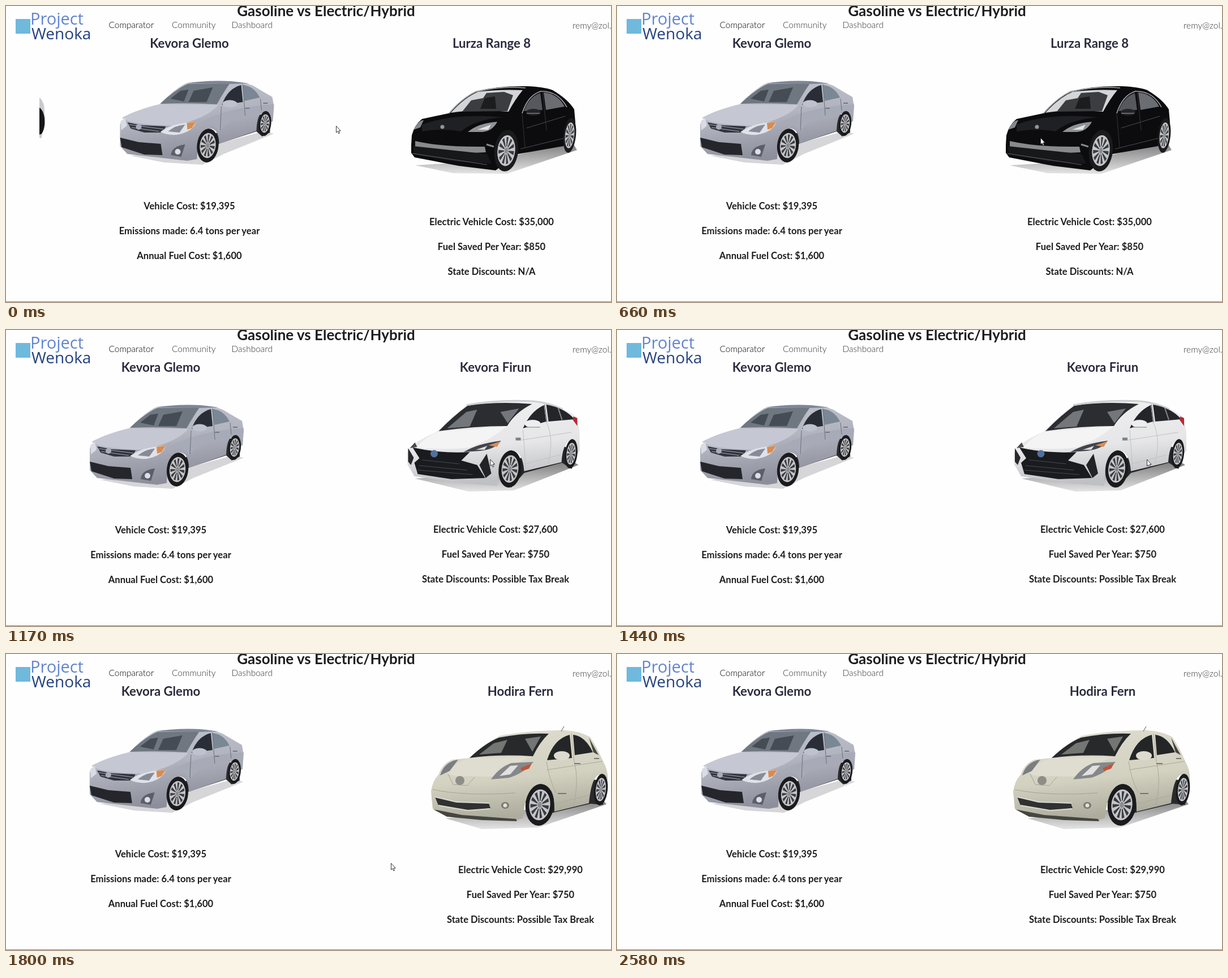
Animation, 1069 px wide and 524 px high, one loop 2890 ms. Source, as an HTML page:

```html
<!DOCTYPE html>
<html lang="en">
<head>
<meta charset="utf-8">
<title>Car comparator</title>
<style>
html, body { margin: 0; width: 100%; height: 100%; overflow: hidden; background: #fefefe; }
body > svg { display: block; }
text { font: 700 16.6px Lato, sans-serif; fill: #1d1d1f; }
.mid { text-anchor: middle; }
.head { font-size: 26px; }
.name { font-size: 22.2px; fill: #2a2b3c; }
.nav { font-size: 15.5px; font-weight: 300; fill: #333; }
.brand { font: 400 29px "Open Sans", sans-serif; }
</style>
</head>
<body>
<svg width="1069" height="524" viewBox="0 0 1069 524">
<defs>
  <linearGradient id="silver" x2="0.3" y2="1"><stop stop-color="#c3c6d0"/><stop offset=".5" stop-color="#b3b6c0"/><stop offset="1" stop-color="#8c8f9b"/></linearGradient>
  <linearGradient id="white" x2="0.2" y2="1"><stop stop-color="#f1f1f2"/><stop offset=".6" stop-color="#e6e6e8"/><stop offset="1" stop-color="#bfc0c4"/></linearGradient>
  <linearGradient id="cream" x2="0.2" y2="1"><stop stop-color="#dedccf"/><stop offset=".6" stop-color="#d3d1c0"/><stop offset="1" stop-color="#aeac9d"/></linearGradient>
  <linearGradient id="fade" x2="0" y2="1"><stop stop-color="#777"/><stop offset="1" stop-color="#e4e4e4"/></linearGradient>
  <g id="wheel">
    <circle r="1" fill="#1b1b1d"/><circle r=".74" fill="#c4c6ca"/>
    <circle r=".42" fill="none" stroke="#3b3c40" stroke-width=".46" pathLength="10" stroke-dasharray=".5 .5"/>
    <circle r=".15" fill="#8a8c90"/>
  </g>
</defs>

<svg x="59" width="428" height="524" viewBox="59 0 428 524">
<g id="left">
  <g class="car">
    <path d="M-20 160Q8 152 13 178L14 200L0 205Z" fill="#c9cace"/>
    <ellipse cx="1" cy="205" rx="13" ry="26" fill="#17171a"/>
    <path d="M-10 232L10 226L8 234Z" fill="#ccc"/>
    <path d="M165 265L290 252L400 222L419 226L330 262L293 281L225 277Z" fill="#d6d6d8"/>
    <path d="M380 192H412V224L398 231L388 222L321 244L300 262L288 240Z" fill="#2b2c31"/>
    <path d="M147 210Q150 194 196 181L217 174Q240 150 261 138Q300 132 341 133Q365 134 382 141Q402 153 416 161L419 178L417 204L411 206Q409 187 400 188Q389 191 388 221L322 244Q322 215 302 217Q284 222 283 271L266 274L160 262L147 248Z" fill="url(#silver)"/>
    <path d="M150 198Q175 184 216 174L321 175Q300 200 240 212Q190 211 163 204Z" fill="#c5c8d2"/>
    <path d="M285 209Q330 180 419 174L417 190Q350 190 322 222Q314 204 285 209Z" fill="#a7aab7"/>
    <path d="M218 173Q243 149 266 138L341 137Q331 151 318 174Q270 171 218 173Z" fill="#6f7780"/>
    <path d="M268 170L277 150L311 144L300 170ZM236 164L254 150L268 148L260 169Z" fill="#454c54"/>
    <path d="M262 137Q300 131 341 133L375 137L342 138Z" fill="#7d869a"/>
    <path d="M327 175Q337 146 361 140L364 170Z" fill="#292e36"/>
    <path d="M363 140Q383 141 394 162L367 168Z" fill="#7a8794"/>
    <path d="M364 139L368 194M326 178L324 220M395 164L397 185" fill="none" stroke="#6d707c"/>
    <path d="M368 181h8M400 172h8" stroke="#747784" stroke-width="2"/>
    <ellipse cx="341" cy="173" rx="13" ry="6.5" fill="#bec2ce"/>
    <path d="M160 206L185 211L228 213L222 224L190 224L166 217Z" fill="#33343d"/>
    <path d="M163 210L224 218M167 215L216 222" stroke="#a5a8b4"/>
    <circle cx="180" cy="214" r="5" fill="#a9adba"/>
    <path d="M218 223Q238 207 281 205Q276 223 247 228Q230 229 218 223Z" fill="#dfe2e8"/>
    <path d="M232 222Q245 211 262 210L252 224Z" fill="#878b97"/>
    <path d="M265 207L281 205L274 216L266 219Z" fill="#d98b4f"/>
    <path d="M148 204L156 198L159 212L149 220Z" fill="#d9dce2"/>
    <path d="M147 233L180 241L219 244L222 264L190 263L150 250Z" fill="#25262c"/>
    <path d="M237 264Q238 248 262 245L255 267Z" fill="#5c5f6a"/><circle cx="249" cy="258" r="5" fill="#dcdfe5"/>
    <use href="#wheel" transform="translate(302 247) rotate(6) scale(19 30)"/>
    <use href="#wheel" transform="translate(403 208) rotate(6) scale(11 22)"/>
  </g>
</g>
</svg>

<svg x="644" width="428" height="524" viewBox="644 0 428 524">
<g id="right">
  <g class="car">
    <path d="M723 282L860 274L1000 240L1009 255L885 297L790 296Z" fill="url(#fade)"/>
    <path d="M716 246L717 229Q722 210 735 200L782 190Q805 163 830 151Q870 141 920 142Q950 143 966 149Q993 165 1004 183L1006 206L1003 240L985 248L905 262L865 291L800 283L722 268L716 260Z" fill="#0c0c0e"/>
    <path d="M786 189Q810 162 834 152Q870 147 913 149Q899 166 888 187Q830 182 786 189Z" fill="#d3d5d7"/>
    <path d="M806 187L822 167L843 163L849 154L880 152L896 158L886 186Z" fill="#3c3d40"/>
    <path d="M838 182L846 163L864 160L866 182Z" fill="#1d1d20"/>
    <path d="M783 190Q806 163 830 152Q875 141 918 145M912 190Q922 158 945 151Q975 150 991 179" fill="none" stroke="#aaacb0" stroke-width="1.5"/>
    <path d="M915 186Q924 161 944 154L948 184Z" fill="#55585c"/>
    <path d="M950 153Q975 155 987 178L954 184Z" fill="#6a6d71"/>
    <path d="M948 151L955 220M912 191L917 250" stroke="#333438"/>
    <path d="M920 216L988 195M909 253L986 234" stroke="#4d4f54"/>
    <path d="M735 210Q790 189 878 197Q829 201 804 222Q770 216 735 222Z" fill="#1f2023"/>
    <path d="M816 223Q835 207 868 205Q860 221 842 223Z" fill="#8f9296"/><path d="M833 219L857 210L852 219Z" fill="#e1e2e4"/>
    <path d="M720 219Q728 203 738 202L732 215Z" fill="#85888c"/>
    <circle cx="771" cy="214" r="3.5" fill="#92959a"/>
    <path d="M723 239Q770 250 846 249L848 259Q770 263 723 249Z" fill="#888a8d"/>
    <path d="M719 248L850 262L858 279L790 275L722 263Z" fill="#17181a"/>
    <path d="M718 261L850 281" stroke="#606267"/>
    <path d="M849 245L862 249" stroke="#888" stroke-width="3"/>
    <ellipse cx="932" cy="188" rx="13" ry="6" fill="#222327"/><path d="M920 190H943" stroke="#aaa"/>
    <use href="#wheel" transform="translate(884 256) rotate(6) scale(21 37)"/>
    <use href="#wheel" transform="translate(996 229) rotate(6) scale(11 31)"/>
  </g>
  <g transform="translate(428)"><g class="car">
    <path d="M715 263L865 250L990 230L1004 239L890 284L810 286Z" fill="url(#fade)"/>
    <path d="M858 235L910 225L975 205L1003 215L992 246L975 235L908 253L885 279Z" fill="#25262a"/>
    <path d="M702 216Q708 200 754 180Q780 152 808 132Q860 124 922 125Q967 129 1001 154L1006 180V214L1001 216Q1000 192 989 195Q976 202 974 234L908 250Q905 211 884 214Q862 220 861 276L805 272L714 259L702 238Z" fill="url(#white)"/>
    <path d="M717 208Q736 188 756 180Q830 175 878 170Q850 194 812 208Q770 213 717 208Z" fill="#f4f4f5"/>
    <path d="M757 179Q782 153 808 134Q860 126 922 131Q892 146 878 170Q819 170 757 179Z" fill="#2b2d31"/>
    <path d="M772 174L806 145L825 141L812 171ZM866 145L899 139L879 165Z" fill="#73767b"/>
    <path d="M806 133Q860 123 923 126Q950 128 976 140" fill="none" stroke="#ccced1" stroke-width="3"/>
    <path d="M906 174Q919 144 943 133L947 162ZM947 132Q980 138 997 158L951 162Z" fill="#232529"/>
    <path d="M968 138L975 159M944 132L948 163" stroke="#888" stroke-width="2"/>
    <path d="M906 177L911 247M947 163Q961 190 951 235M910 237L972 221M902 195L992 181" fill="none" stroke="#c0c1c5"/>
    <path d="M893 193h9" stroke="#7d8187" stroke-width="5"/>
    <path d="M995 153L1002 156V170L994 159Z" fill="#b42a34"/>
    <ellipse cx="923" cy="166" rx="14" ry="7" fill="#eeeef0"/><path d="M911 172H936" stroke="#77797e"/>
    <path d="M711 208Q760 219 812 216L797 231L825 239L839 262L780 264L720 255L714 235L723 227Z" fill="#1a1b1e"/>
    <path d="M728 230L794 237M722 240L807 248M720 248L817 256" stroke="#484a4f"/>
    <circle cx="749" cy="219" r="6.5" fill="#51719c"/>
    <path d="M801 216Q826 201 867 196Q858 211 830 214Z" fill="#42454b"/><path d="M845 204L866 197L860 207Z" fill="#d98c56"/>
    <path d="M823 212L843 205L838 212Z" fill="#d9dbde"/>
    <path d="M706 209L715 199L719 207Z" fill="#484b50"/>
    <path d="M829 239L842 219L850 254L840 262Z" fill="#222327"/>
    <path d="M703 209L713 226L708 239L703 233Z" fill="#28292d"/>
    <use href="#wheel" transform="translate(883 246) rotate(6) scale(20 33)"/>
    <use href="#wheel" transform="translate(991 219) rotate(6) scale(11 26)"/>
  </g></g>
  <g transform="translate(856)"><g class="car">
    <path d="M726 291L860 277L1000 253L1010 266L890 307L790 310Z" fill="url(#fade)"/>
    <path d="M863 255L985 222L1008 225L1004 267L982 265L915 281L890 303Z" fill="#292a2b"/>
    <path d="M700 243Q703 224 713 214Q721 193 738 187L769 184Q793 161 821 145Q870 135 936 135Q965 137 981 147Q994 166 1004 190Q1013 205 1012 222L1009 242Q1007 212 996 214Q983 220 979 264L918 279Q919 232 895 231Q867 234 862 291L851 294Q780 291 730 284L703 274Z" fill="url(#cream)"/>
    <path d="M729 212Q742 190 770 184L879 182Q848 191 818 216Q800 218 769 216Q746 218 729 212Z" fill="#dfddd0"/>
    <path d="M768 184Q795 158 820 148Q866 139 908 141Q892 156 880 181Q820 177 768 184Z" fill="#27292b"/>
    <path d="M785 178L811 158L835 152L824 175ZM866 150L894 146L879 173Z" fill="#737673"/>
    <path d="M905 188Q917 150 945 143L949 184ZM951 143Q972 145 986 174L954 179Z" fill="#232526"/>
    <path d="M948 141L953 190Q962 223 952 269M904 190Q908 220 921 246M920 265L979 250M905 205L1003 190" fill="none" stroke="#aaa899"/>
    <path d="M979 148L996 179L987 174Z" fill="#464743"/>
    <path d="M930 137L935 128" stroke="#555"/>
    <path d="M953 194h11M988 185h9M924 247h15" stroke="#77776e" stroke-width="2"/>
    <ellipse cx="931" cy="180" rx="14" ry="8" fill="#dddbd0"/>
    <path d="M806 222Q820 201 842 193L881 191Q864 211 838 219Z" fill="#85878a"/>
    <path d="M821 216L840 198L854 197L840 213Z" fill="#e0e1e0"/><path d="M858 202L878 194L873 203L861 207Z" fill="#bf5536"/>
    <path d="M716 215Q723 191 748 187L733 207Z" fill="#7b7e80"/>
    <path d="M730 212L739 231L764 233L777 218M703 240Q760 252 849 246" fill="none" stroke="#a4a294"/>
    <circle cx="751" cy="224" r="8" fill="#8e8e87"/>
    <path d="M707 253L745 262L802 264L805 273L765 277L713 268Z" fill="#303130"/>
    <path d="M707 253L745 262L803 264M713 268L765 277L804 274" fill="none" stroke="#d9dad5" stroke-width="2"/>
    <path d="M704 275L755 285L850 292L852 296L790 294L728 288Z" fill="#45463f"/>
    <ellipse cx="831" cy="268" rx="7" ry="6" fill="#77786f"/><circle cx="831" cy="268" r="3.5" fill="#e0e0dc"/>
    <use href="#wheel" transform="translate(892 267) rotate(6) scale(25 37)"/>
    <use href="#wheel" transform="translate(1000 240) rotate(6) scale(12 28)"/>
  </g></g>
</g>
</svg>

<text class="mid head" x="565.5" y="18">Gasoline vs Electric/Hybrid</text>
<rect x="17" y="23" width="26" height="26" fill="#6fb9dd"/>
<text class="brand" x="43" y="33" style="fill:#6384cf">Project</text>
<text class="brand" x="45" y="59" style="fill:#24417f;font-size:28px">Wenoka</text>
<text class="nav" x="181.5" y="39" style="fill:#000">Comparator</text>
<text class="nav" x="293" y="39">Community</text>
<text class="nav" x="398.5" y="39">Dashboard</text>
<text class="nav" x="1001" y="40">remy@zol.</text>
<path d="M0 523.5H1069" stroke="#858585"/>
<path id="cursor" d="M.5 .5V12L3 9.7L4.8 13.8L6.6 13L4.9 9H8.3Z" fill="#fff" stroke="#222" stroke-width=".9"/>
</svg>

<script>
const $ = id => document.getElementById(id);
const left = $('left'), right = $('right'), cursor = $('cursor');

function label(parent, x, y, words, kind = '') {
  const el = document.createElementNS('http://www.w3.org/2000/svg', 'text');
  el.setAttribute('x', x);
  el.setAttribute('y', y);
  el.setAttribute('class', 'mid ' + kind);
  el.textContent = words;
  parent.append(el);
}
function facts(parent, x, y, name, ...lines) {
  label(parent, x, 73.5, name, 'name');
  lines.forEach((line, i) => label(parent, x, y + i * 44.1, line));
}
const electric = (slot, y, name, cost, saved, discount) =>
  facts(right, 858 + slot * 428, y, name, 'Electric Vehicle Cost: $' + cost,
    'Fuel Saved Per Year: $' + saved, 'State Discounts: ' + discount);

facts(left, 273.5, 360, 'Kevora Glemo', 'Vehicle Cost: $19,395',
  'Emissions made: 6.4 tons per year', 'Annual Fuel Cost: $1,600');
electric(0, 388, 'Lurza Range 8', '35,000', 850, 'N/A');
electric(1, 358.5, 'Kevora Firun', '27,600', 750, 'Possible Tax Break');
electric(2, 388, 'Hodira Fern', '29,990', 750, 'Possible Tax Break');

const LOOP = 2890;
const ticks = [0, 150, 300, 420, 540, 660, 780, 930, 1050, 1170, 1290, 1440, 1560,
  1680, 1800, 1920, 2040, 2190, 2310, 2460, 2580];
// Each key is [time, value, ...].
const leftKeys = [[0, 50.5], [150, 9], [300, 1], [420, 0]];
const rightKeys = [[0, 0], [540, 0], [660, -23], [780, -190], [930, -347], [1050, -402], [1170, -421],
  [1290, -427], [1440, -428], [1560, -500], [1680, -724], [1800, -805], [1920, -845], [2040, -854], [2190, -856]];
const leftSway = [[0, 4], [150, 1], [660, 0], [930, 2], [1440, 0], [1680, 1], [2040, .5], [2580, 2]];
const rightSway = [[0, 0], [150, -4], [660, -6], [930, 1], [1440, 0]];
const pointer = [[0, 583, 212], [300, 655, 220], [540, 771, 232], [660, 748, 233], [780, 640, 236], [930, 716, 230],
  [1290, 925, 228], [1440, 936, 229], [1560, 830, 245], [1680, 597, 273], [1800, 680, 370],
  [1920, 870, 492], [2040, 980, 521], [2190, 1000, 540]];

function at(keys, t, n = 1) {
  const i = keys.findIndex(k => k[0] > t);
  if (i < 0) return keys.at(-1)[n];
  const a = keys[i - 1], b = keys[i];
  return a[n] + (b[n] - a[n]) * (t - a[0]) / (b[0] - a[0]);
}
const move = (el, x, y = 0) => el.setAttribute('transform', `translate(${x} ${y})`);

function draw() {
  const now = performance.now() % LOOP;
  const t = ticks.findLast(k => k <= now);
  move(left, at(leftKeys, t));
  move(right, at(rightKeys, t));
  left.querySelectorAll('.car').forEach(c => move(c, at(leftSway, t)));
  right.querySelectorAll('.car').forEach(c => move(c, at(rightSway, t)));
  move(cursor, at(pointer, t), at(pointer, t, 2));
  requestAnimationFrame(draw);
}
draw();
</script>
</body>
</html>
```
